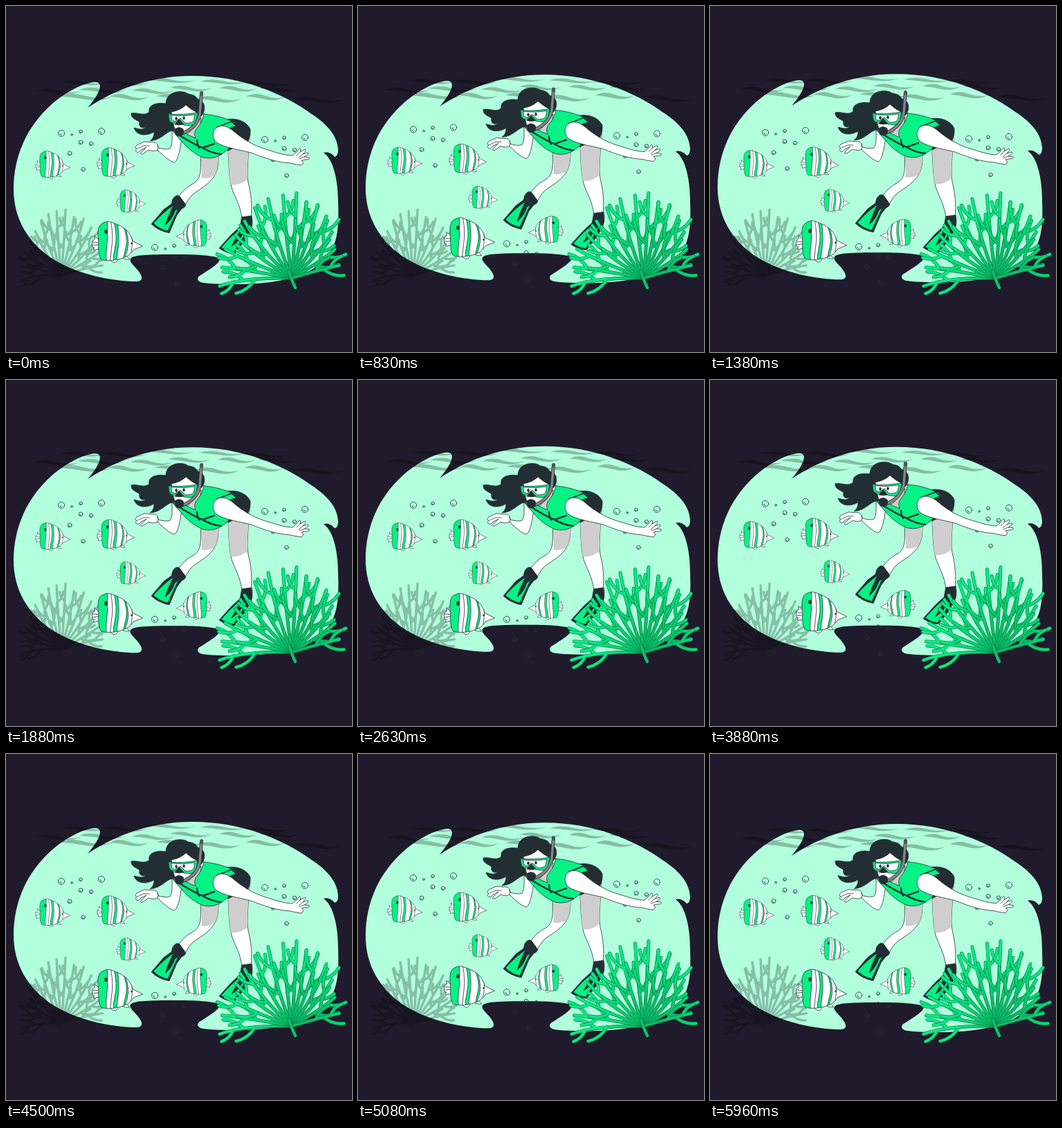
Animation, 500 px wide and 500 px high, one loop 6000 ms. Source, as an HTML page:

```html
<!DOCTYPE html>
<html lang="en">
<head>
<meta charset="utf-8">
<title>Diver on a reef</title>
<style>
  html, body { margin: 0; width: 100%; height: 100%; overflow: hidden; background: #201b2c; }
  svg { display: block; width: 100vw; height: 100vh; }
  .line { stroke: #263238; stroke-width: .8; stroke-linejoin: round; stroke-linecap: round; }
  .none { fill: none; }
  .white { fill: #fff; }
  .gray { fill: #cecece; }
  .dark { fill: #232d34; }
  .green { fill: #05f284; }
</style>
</head>
<body>
<svg viewBox="0 0 500 500">
  <defs>
    <radialGradient id="coralTint" gradientUnits="userSpaceOnUse" cx="425" cy="372" r="85">
      <stop offset=".2" stop-color="#0cba68"/>
      <stop offset="1" stop-color="#08ea86"/>
    </radialGradient>
    <path id="fishBody" d="M-27 -4 C-28 -14 -28 -20 -24 -25 Q-17 -31 -9 -29 L1 -25 C11 -21 19 -14 23 -1 L37 6 L24 11 C20 17 15 21 9 23 C-2 27 -16 28 -23 25 C-27 20 -27 12 -27 -4Z"/>
    <clipPath id="bodyClip"><use href="#fishBody"/></clipPath>
    <g id="fish" class="line">
      <g class="white">
        <path d="M-26 -3 L-33 -9 L-32 -4 L-36 -1 L-36 7 L-33 8 L-34 12 L-26 10Z"/>
        <path class="none" d="M-27 1 L-35 0 M-27 4 L-35 5"/>
        <path d="M-12 22 Q-10 29 -3 30 Q2 28 3 20Z"/>
        <path d="M8 18 Q14 19 18 25 Q10 26 6 22Z"/>
      </g>
      <g clip-path="url(#bodyClip)">
        <path class="white" d="M-40 -32H40V32H-40Z"/>
        <g class="green">
          <path d="M-40 -32H-14Q-13 -8 -15 8T-14 32H-40Z"/>
          <path d="M-5 -32Q1 -8 -3 8Q-6 20 -5 32H-1Q0 18 2 6Q4 -8 0 -32Z"/>
          <path d="M8 -24Q16 -8 13 6L9 24H11Q15 14 16 5Q17 -6 12 -20Z"/>
        </g>
        <path class="none" d="M-9 -30Q-5 -8 -8 9L-10 28 M20 -12Q24 0 20 16"/>
      </g>
      <use href="#fishBody" class="none"/>
      <ellipse class="dark" cx="-16" cy="-15" rx="2" ry="2.8"/>
      <circle class="dark" cx="21" cy="2" r=".9"/>
    </g>
  </defs>

  <path id="pool" fill="#b1ffdd" d="M11 265 C11 216 31 173 66 142 C88 123 113 111 128 110 C141 109 138 124 118 147 C150 126 200 101 270 101 C340 101 400 126 440 155 C468 173 479 190 480 208 Q480 217 475 218 C470 212 464 210 459 212 C474 222 480 255 480 285 C481 310 480 330 474 345 C460 380 420 402 330 402 Q290 402 281 399 C275 396 276 391 283 388 C295 380 312 370 308 365 C303 360 270 359 245 359 C215 359 188 359 181 364 C175 369 188 377 192 384 C198 392 198 398 188 398 C155 398 104 388 70 367 C30 342 11 305 11 265Z"/>
  <g id="waves" opacity=".25"></g>
  <g id="farCoral" opacity=".25" fill="none" stroke="#000" stroke-width="3.4" stroke-linecap="round" stroke-linejoin="round"></g>

  <g id="floaters">
    <g id="bubbles" class="line none"></g>

    <g class="line">
      <!-- legs -->
      <path class="white" d="M281 211 L307 217 C307 232 305 240 300 247 C292 259 278 266 270 272 C265 277 261 283 258 290 L247 281 C250 272 260 262 270 257 C280 251 283 244 281 211Z"/>
      <path class="gray" stroke="none" d="M281 211 L307 217 C307 230 305 238 302 244 Q291 251 282 248 Q284 240 281 211Z"/>
      <path class="white" d="M321 207 L352 190 C351 215 347 238 350 255 C354 270 356 288 354 308 L341 307 C339 288 330 275 326 262 C322 245 322 230 321 207Z"/>
      <path class="gray" stroke="none" d="M321 207 L352 190 C351 212 348 232 349 250 Q338 260 325 258 C322 242 322 226 321 207Z"/>
      <path class="dark" d="M318 164 C334 161 348 167 353 178 Q354 187 350 195 L321 209Z"/>
      <!-- fins -->
      <path class="dark" d="M241 279 Q246 271 251 275 L259 286 Q261 290 254 293 L247 302 L236 328 Q220 325 210 315 L228 294 L239 286Z"/>
      <path class="green" d="M242 288 Q228 297 213 314 Q222 323 234 325 Q242 307 249 293 L244 296 Q240 309 230 317 Q234 303 242 288Z"/>
      <path class="dark" d="M341 305 L355 303 Q358 318 352 327 L346 338 L330 358 Q317 357 308 350 L325 331 L338 319Z"/>
      <path class="green" d="M341 320 Q324 333 311 349 Q319 355 329 356 Q340 340 348 325 L343 327 Q338 340 326 347 Q332 335 341 320Z"/>
      <!-- near arm -->
      <path class="white" d="M240 180 C240 192 241 200 237 206 C231 208 225 206 220 205 L219 200 Q216 196 210 197 L200 196 L189 201 Q185 206 189 206 Q186 210 189 211 Q191 213 195 208 L203 204 L195 212 Q194 216 199 213 L206 208 Q214 211 219 208 C228 217 236 224 243 226 C249 224 252 204 254 190Z"/>
      <path class="none" d="M190 206 L199 202 L207 202 M219 201 Q221 205 219 208"/>
      <!-- hair, neck, face -->
      <path class="dark" d="M284 157 C290 147 286 136 277 135 C273 126 264 129 260 125 C247 121 231 126 231 141 C219 139 205 142 207 153 C200 160 190 153 181 155 C180 163 189 164 193 168 C191 176 199 178 202 174 C199 181 190 177 185 176 C188 187 202 189 214 182 C214 188 212 192 208 195 C225 194 231 181 241 180 C251 181 269 170 284 157Z"/>
      <path class="gray" d="M258 182 L282 162 L278 188 L268 194Z"/>
      <path class="white" d="M239 153 Q252 151 260 143 Q269 151 276 154 Q277 162 272 170 C268 181 263 186 256 187 L245 181 Q240 168 239 153Z"/>
      <path class="green" d="M235 156 Q255 158 277 154 L275 166 Q273 172 266 173 L257 172 L251 164 L245 169 Q238 170 236 165Z"/>
      <path class="white" d="M239 158 Q256 160 273 157 L271 166 Q267 170 259 169 L252 162 L244 167 L240 165Z"/>
      <ellipse class="dark" cx="246" cy="162.5" rx="1.3" ry="2.1"/>
      <ellipse class="dark" cx="257" cy="162" rx="1.3" ry="2.1"/>
      <path class="dark" d="M244 171 L250 164 L257 171 Q250 173 244 171Z"/>
      <!-- vest -->
      <path class="green" d="M286 156 Q309 158 330 168 L333 173 Q327 175 322 177 L325 195 Q325 206 316 211 Q302 223 285 219 C265 211 256 198 241 181 L255 182 Q264 187 274 191 Q270 183 277 175 Q284 167 286 156Z"/>
      <path class="none" style="stroke-width:1.8" d="M305 175 L326 167 L333 173"/>
      <path class="none" style="stroke-width:2.4" d="M251 187 Q268 198 284 205 Q298 213 311 214 M279 205 Q276 200 276 194 M284 205 L301 199"/>
      <!-- far arm -->
      <path class="white" d="M305 175 C312 171 321 174 329 181 C345 195 363 204 382 209 C394 213 405 216 414 216 L420 211 L424 206 Q427 206 425 211 L432 207 Q435 208 429 214 L436 212 Q439 214 431 218 L438 219 Q440 222 432 222 L427 223 Q432 226 427 230 Q417 229 411 227 C392 226 374 220 354 212 C339 208 316 205 304 197 C297 190 298 179 305 175Z"/>
      <path class="none" d="M425 211 L420 216 M429 214 L423 219 M431 218 L424 221"/>
      <!-- snorkel -->
      <g class="none">
        <path style="stroke-width:5" d="M282.5 126 L280 156 Q276 176 255 184"/>
        <path style="stroke-width:3.4;stroke:#858585" d="M282.5 126 L280 156 Q276 176 255 184"/>
        <path style="stroke-width:4;stroke:#555" d="M282.5 125 v3"/>
      </g>
      <path class="dark" d="M244 178 Q250 173 256 178 Q259 185 252 188 Q243 189 244 178Z"/>
    </g>

    <g id="school"></g>
  </g>
  <g id="nearCoral" fill="none" stroke-linecap="round" stroke-linejoin="round"></g>
</svg>

<script>
const LOOP = 6000, FPS = 24;
const el = id => document.getElementById(id);
const range = n => Array.from({ length: n }, (_, i) => i);

// Repeatable noise between -1 and 1.
const noise = n => 2 * ((Math.abs(Math.sin(n * 12.9898 + 4.1) * 43758.5453)) % 1) - 1;

// Surface ripples: pointed leaves in three loose rows.
function ripple(i) {
  const row = i % 3, k = Math.floor(i / 3);
  const x = [78, 42, 82][row] + k * 66 + noise(i) * 8;
  const y = 109 + row * 11.5 + noise(i + 40) * 2.5;
  const w = 66 + noise(i + 80) * 12, h = 6.5 + row;
  return `<path d="M${x} ${y}q${w * .22} ${-h * .8} ${w * .48} ${-h * .1}t${w * .52} ${h * .15}` +
    `q${-w * .25} ${h * .9} ${-w * .5} ${h * .5}t${-w * .5} ${-h * .55}z"/>`;
}
el('waves').innerHTML = range(18).filter(i => i !== 15).map(ripple).join('');

// One bubble cluster, repeated at offsets.
const cluster = [
  [80, 184, 4.6], [95, 186, 1.3], [108, 181.5, 2.4], [138, 181, 4.6],
  [108, 197, 3], [123, 199, 2.7], [92, 213, 3], [111.5, 236, 2.8]
];
const bubble = ([x, y, r]) => `<circle cx="${x}" cy="${y}" r="${r}"/>` +
  (r > 2 ? `<path d="M${x - r * .5} ${y + r * .1}a${r * .5} ${r * .5} 0 0 0 ${r * .6} ${r * .45}"/>` : '');
const bubblesAt = (dx, dy, list = cluster) => list.map(([x, y, r]) => bubble([x + dx, y + dy, r])).join('');
el('bubbles').innerHTML = bubblesAt(0, 0) + bubblesAt(294, 9) +
  bubblesAt(135, 165, cluster.filter(([x]) => x < 130));

// x, y, scale, direction
el('school').innerHTML = [
  [67.5, 229.5, .68, 1], [158.5, 226.5, .74, 1], [180.5, 282.5, .57, 1], [160.5, 341, 1, 1], [271.5, 329, .68, -1]
].map(([x, y, s, dir]) =>
  `<use href="#fish" transform="translate(${x} ${y}) scale(${s * dir} ${s})"/>`).join('');

// A coral fan: stems end on a lopsided half ellipse and fork towards their tips.
function fan({ x, y, left, right, up, stems, twig }) {
  return range(stems).map(i => {
    const a = Math.PI * (1.03 - i / (stems - 1) * .98);
    const reach = .96 + .06 * noise(i + 7);
    const ex = Math.cos(a) * (a > Math.PI / 2 ? left : right) * reach, ey = -Math.sin(a) * up * reach;
    const cx = ex * .68, cy = ey * .42 - 6;
    const at = t => [2 * t * (1 - t) * cx + t * t * ex, 2 * t * (1 - t) * cy + t * t * ey];
    let d = `M${x} ${y}q${cx} ${cy} ${ex} ${ey}`;
    [.42, .58, .74].forEach((t, k) => {
      const [px, py] = at(t), [qx, qy] = at(t + .02);
      const dir = Math.atan2(qy - py, qx - px), side = (i + k) % 2 ? 1 : -1;
      const len = twig * (1.2 - .5 * t + .2 * noise(i * 5 + k));
      const step = (turn, m) => `${Math.cos(dir + side * turn) * len * m} ${Math.sin(dir + side * turn) * len * m}`;
      d += `M${x + px} ${y + py}q${step(.95, .55)} ${step(.55, 1)}`;
    });
    return d;
  });
}
const far = fan({ x: 80, y: 389, left: 57, right: 64, up: 96, stems: 15, twig: 21 });
el('farCoral').innerHTML = `<path d="${far.join('')}M80 389l-4 5"/>`;

const near = fan({ x: 413, y: 393, left: 103, right: 74, up: 124, stems: 15, twig: 33 });
near.push('M409 384Q412 394 418 407');
el('nearCoral').innerHTML = near.map(d =>
  `<path d="${d}" stroke="#08763f" stroke-width="5"/><path d="${d}" stroke="url(#coralTint)" stroke-width="3.8"/>`).join('');

// Linear rise and fall between 0 and 1.
const swing = (t, period) => 1 - Math.abs(1 - 2 * (t % period) / period);
const move = (id, x, y) => el(id).setAttribute('transform', `translate(${x.toFixed(3)} ${y.toFixed(3)})`);

function draw(now) {
  const t = Math.floor((now % LOOP) * FPS / 1000 + .1) * 1000 / FPS;
  const slow = -6 * swing(t, LOOP), quick = swing(t, 1500);
  move('pool', 0, slow);
  move('waves', -4.5 * quick, slow);
  move('floaters', 0, -6.2 * quick);
}
function tick() {
  draw(performance.now());
  requestAnimationFrame(tick);
}
tick();
</script>
</body>
</html>
```
